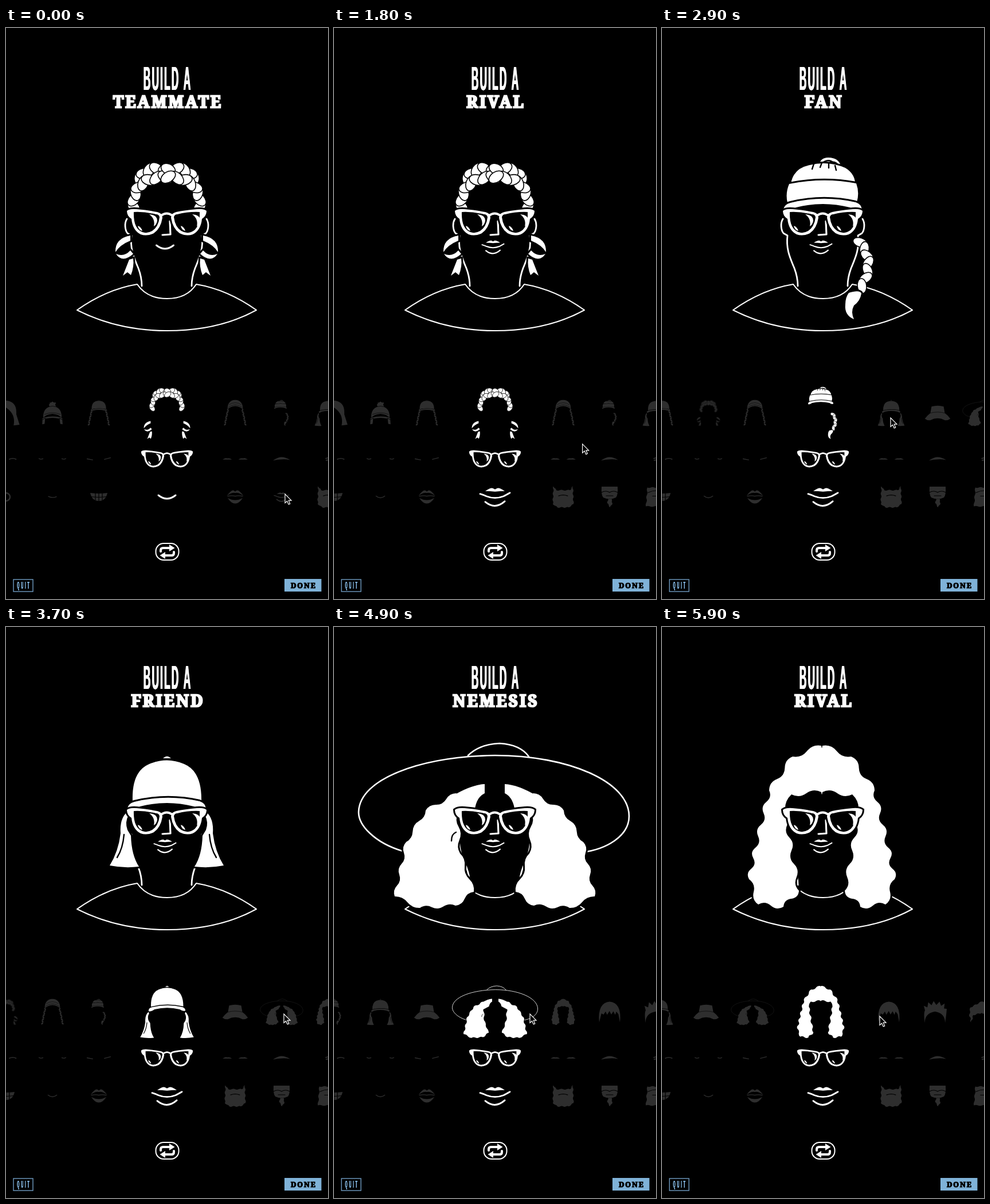
Recreate the animation shown at these times as an HTML page. Size 562x996 px, loop 6 s.

```html
<!DOCTYPE html>
<html lang="en">
<head>
<meta charset="utf-8">
<title>Build a character</title>
<style>
  html, body { margin: 0; width: 100%; height: 100%; overflow: hidden; background: #000; }
  svg { position: absolute; left: 0; top: 0; display: block; }
  .f { fill: #fff; stroke: #000; stroke-width: 6; paint-order: stroke; }
  .w { fill: #fff; }
  .l { fill: none; stroke: #fff; stroke-width: 2.6; stroke-linecap: round; stroke-linejoin: round; }
  .k { fill: none; stroke: #000; stroke-width: 2.4; stroke-linecap: round; }
  .lobe { fill: #fff; stroke: #000; stroke-width: 1.6; }
  .slab { font: 900 28px "Noto Serif", serif; text-anchor: middle; letter-spacing: 3px; }
  .narrow {
    position: absolute; line-height: 1; white-space: nowrap; color: #fff;
    font-family: "Liberation Sans", Arial, sans-serif; font-weight: 700;
    transform: translateX(-50%) scaleX(.3);
    text-shadow: .03em 0, -.03em 0;
  }
  #build { left: 281px; top: 59px; font-size: 58px; letter-spacing: 7px; text-indent: 7px; }
  #quit { left: 30px; top: 963.5px; font-size: 17px; letter-spacing: 10px; text-indent: 10px; color: #7fb0d8; }
</style>
</head>
<body>
<svg width="562" height="996" viewBox="0 0 562 996">
  <defs id="defs"></defs>
  <g id="face">
    <path class="l" style="stroke-width:2.1" d="M229 447Q175 456 124 492Q195 528 281 528Q372 528 437 492Q386 456 332 447Q316 472 281 472Q246 472 229 447Z"/>
    <g id="head"></g>
    <use id="hair"/>
    <path class="l" style="stroke-width:3.2" d="M286 337L287 360L273 361"/>
    <use href="#eyes3"/>
    <use id="mouth"/>
  </g>
  <g id="strips"></g>
  <text id="word" class="slab" x="282.5" y="138.8" fill="#fff" stroke="#fff" stroke-width="2.6"></text>
  <rect class="l" x="261.5" y="899" width="40" height="29" rx="13.5" style="stroke-width:2"/>
  <g id="shuffle"></g>
  <rect x="13" y="962" width="34" height="21" fill="none" stroke="#6f9cc2" stroke-width="1.4"/>
  <rect x="486" y="961" width="64.5" height="22" fill="#7fb2d8"/>
  <text class="slab" x="519.3" y="976.5" style="font-size:12.5px;letter-spacing:1.8px" stroke="#000" stroke-width="1.2">DONE</text>
  <path id="cursor" d="M0 0V15.5L3.6 12.2L6.2 18L8.7 16.9L6.3 11.2H11Z" fill="#000" stroke="#fff" stroke-width="1.2"/>
</svg>
<div id="build" class="narrow">BUILD A</div>
<div id="quit" class="narrow">QUIT</div>
<script>
const $ = id => document.getElementById(id);
const path = (cls, d) => `<path class="${cls}" d="${d}"/>`;
const fill = d => path('f', d), white = d => path('w', d), ink = d => path('k', d);
const line = (d, w = 2.6) => `<path class="l" d="${d}" style="stroke-width:${w}"/>`;
const flip = s => `<g transform="matrix(-1 0 0 1 561 0)">${s}</g>`;
const both = s => s + flip(s);
const scaled = (k, s) => `<g transform="scale(${k})">${s}</g>`;
const points = s => s.split(' ').map(p => p.split(',').map(Number));
const sym = (pts, axis) => [...pts, ...[...pts].reverse().map(([x, y]) => [axis - x, y])];

// Closed outline rippling along the given corners
function wave(pts, len, amp) {
  let d = `M${pts[0]}`, side = 1;
  pts.forEach(([a, b], i) => {
    const [x, y] = pts[(i + 1) % pts.length], dx = x - a, dy = y - b, h = Math.hypot(dx, dy) || 1;
    const n = Math.max(1, Math.round(h / len));
    for (let k = 0; k < n; k++, side = -side) {
      const m = (k + .5) / n, e = (k + 1) / n, o = amp * side / h;
      d += `Q${a + dx * m - dy * o} ${b + dy * m + dx * o} ${a + dx * e} ${b + dy * e}`;
    }
  });
  return d + 'Z';
}

// Tilted lobes along a quadratic curve
function braid(curve, n, rx, ry, tilt = 35) {
  const [[ax, ay], [cx, cy], [bx, by]] = points(curve);
  let s = '';
  for (let i = 0; i < n; i++) {
    const t = i / (n - 1), u = 1 - t;
    const x = u * u * ax + 2 * u * t * cx + t * t * bx, y = u * u * ay + 2 * u * t * cy + t * t * by;
    const dir = Math.atan2(u * (cy - ay) + t * (by - cy), u * (cx - ax) + t * (bx - cx)) * 180 / Math.PI;
    s += `<ellipse class="lobe" rx="${rx}" ry="${ry}" transform="translate(${x} ${y}) rotate(${dir + (i % 2 ? tilt : -tilt)})"/>`;
  }
  return s;
}

const brim = fill('M212 319Q212 308 224 305Q281 291 338 304Q348 307 349 317Q341 322 328 313Q281 301 234 313Q220 323 212 319Z');
const cap = white('M274 229Q281 222 288 229Z') +
  fill('M221 304Q219 252 250 239Q281 226 311 239Q342 252 341 304Q281 290 221 304Z') + brim;
const sideHair = both(fill('M212 322Q198 334 200 360Q196 392 181 416Q206 421 232 418Q219 398 218 364L212 354Q207 340 214 328Z') +
  ink('M206 362Q204 386 194 402'));
const plaits = both(braid('222,312 208,370 198,428', 8, 11, 7));
const crown = both(braid('233,264 244,240 278,246', 5, 13, 9) + braid('223,312 220,262 278,260', 8, 14, 9));
const bows = both(fill('M217 362Q190 367 191 391Q199 378 217 371Z') +
  fill('M192 394Q203 411 222 394L217 388Q206 400 192 394Z') +
  fill('M215 404L204 432L212 426L218 431Q224 416 222 402Z'));
const beanie = white('M274 240Q276 226 290 226Q310 226 313 244Z') + ink('M280 235Q292 227 300 236M290 236Q302 230 308 240') +
  fill('M225 271Q230 244 258 239Q290 231 320 244Q336 254 337 270Q281 256 225 271Z') +
  ink('M262 246L265 237M276 243L279 235M291 244V236M304 248L302 240') +
  fill('M222 272Q281 260 339 271Q345 287 340 304Q281 296 219 305Q215 288 222 272Z') + brim;
const tail = braid('346,374 372,408 349,450', 7, 13, 8) +
  fill('M326 462Q345 456 348 463Q346 476 335 484Q329 495 335 508Q318 501 320 482Q320 470 326 462Z');
const sunHat =
  line('M120 391C70 376 42 345 43 322C45 265 150 226 281 224C410 224 515 270 515 330C515 365 475 388 433 393') +
  line('M234 224Q255 204 289 203Q325 205 340 226') +
  both(fill(wave(points('214,290 160,320 126,375 106,470 150,490 212,486 244,462 220,395 216,325'), 21, 6)) +
    white('M208 294Q240 275 263 274V290Q250 296 246 316L212 334Z') + ink('M348 358Q356 361 356 373'));
const curls = fill(wave(sym(points('278,207 228,226 187,285 163,385 152,440 168,484 212,488 239,460 226,390 215,322 226,292 278,288'), 558), 22, 8));
const dome = 'M218 312Q216 232 281 230Q345 232 343 312Q330 284 281 280Q232 284 218 312Z';

const hair = [
  fill('M212 330Q205 245 281 238Q356 245 350 330L372 400L332 405Q348 330 281 285Q214 330 228 405L190 400Z'),
  fill(wave(points('262,202 300,202 304,238 258,238'), 12, 6)) + fill(dome) + brim + ink('M228 284Q281 262 334 284') +
    both(fill('M214 320L232 312L228 348L212 350Z')),
  cap + plaits,
  crown + bows,
  fill(dome) + ink('M224 290Q281 250 337 290M232 268Q281 236 329 268') + plaits,
  beanie + tail,
  sideHair + cap,
  fill('M232 284L240 240Q281 228 321 240L329 284Q352 300 366 322Q350 335 330 332Q281 306 231 332Q210 335 195 322Q210 300 232 284Z') + ink('M231 284Q281 270 330 284'),
  sunHat,
  curls,
  fill('M211 372Q198 240 281 233Q364 240 350 372L340 318L326 300L318 322L306 298L292 320L280 296L264 322L254 300L240 320L226 312Z'),
  fill('M212 370Q204 300 214 286L206 256L230 266L236 232L258 252L272 224L290 250L312 228L322 256L346 240L342 274L360 276Q358 310 349 370Q348 304 281 294Q214 304 212 370Z'),
  fill(wave(sym(points('281,214 206,254 198,300 210,355 226,305 281,290'), 562), 20, 7))
];

const rims = both(path('f', 'M211 319Q216 315 228 316Q250 318 264 321Q273 323 273 331Q270 350 258 358Q246 364 235 360Q221 353 219 333Q211 328 211 319Z') +
  path('', 'M223 321Q222 350 238 356Q246 359 255 354Q266 347 268 330Q267 325 262 325Q242 320 223 321Z'));
const glint = white('M250 325Q264 326 264 336Q263 343 258 346Q261 333 250 325ZM230 345Q236 347 238 354Q231 352 230 345Z');
const eyes = [
  line('M-45 0Q-30 -9 -9 0M27 0Q45 -9 63 0', 5),
  line('M-72 -3Q-63 3 -51 -2M51 -2Q63 3 72 -3', 4),
  line('M-63 -3L-33 3M30 0L63 -9', 4),
  rims + line('M271 327Q280.5 320 290 327', 4) + glint + `<g transform="translate(75)">${glint}</g>`,
  both(white('M213 348Q228 336 238 342Q250 338 263 348Z')),
  white('M-46 6Q-20 -12 0 -12Q20 -12 46 3Q18 -2 0 0Q-20 0 -46 6Z'),
  line('M-12 0L12 -6M-10 10L12 5', 5)
];

const bow = 'M-17 -11Q-8 -17 -4 -16L0 -14L4 -16Q8 -17 17 -11Q8 -11 0 -10Q-8 -11 -17 -11Z';
const mouths = [
  '<circle class="l" r="14" style="stroke-width:5"/>',
  line('M-14 1Q0 8 14 2'),
  white('M-30 -12Q0 -8 30 -12Q24 16 0 16Q-24 16 -30 -12Z') + ink('M-27 1Q0 5 27 1M-12 -11V14M0 -10V16M12 -11V14'),
  line('M-15 -4Q0 8 15 -4', 3),
  white('M-29 -1Q-14 -22 -6 -20L0 -16L6 -20Q14 -22 29 -1Q12 -14 0 -11Q-12 -14 -29 -1Z') +
    line('M-26 0Q-10 -3 0 0Q10 -3 26 0') + white('M-26 7Q0 21 26 7Q14 26 0 26Q-14 26 -26 7Z'),
  white(bow) + line('M-26 -6Q-19 -4 -15 -2Q0 4 15 -2Q19 -4 26 -8', 2.8) + line('M-17 8Q0 22 17 7', 3),
  white(wave(points('-34,-36 -24,-22 24,-22 34,-36 36,26 20,38 -20,38 -36,26'), 11, 3)) + ink('M-16 -2Q0 -8 16 -2'),
  white('M-28 -34H28Q30 -4 22 4Q0 14 -22 4Q-30 -4 -28 -34Z') + ink('M-28 -14Q-14 -22 0 -14Q14 -22 28 -14M-12 -2H12') +
    white(wave(points('-5,8 6,8 10,24 2,38 -8,24'), 9, 3)),
  white(wave(points('-30,-34 30,-34 35,32 -35,32'), 13, 3)) + ink('M-28 -16Q0 -30 28 -16M-12 -4H12')
];

// Moves are [start, duration, target...]
const rows = [
  { id: 'hair', items: hair, y: 671.5, fit: h => Math.min(.52, 91 / h),
    moves: [[2160, 400, 5], [2900, 300, 6], [3700, 150, 7.78], [4250, 350, 8], [5300, 300, 9.05]] },
  { id: 'eyes', items: eyes, y: 751.5, fit: () => .65, moves: [] },
  { id: 'mouth', items: mouths, y: 818, fit: () => 1, moves: [[450, 800, 5.45], [1300, 300, 5]] }
];
const pointer = [[450, 800, 288, 846], [1400, 600, 484, 684], [2160, 400, 322, 682], [2560, 300, 399, 680],
  [2900, 300, 318, 678], [3250, 400, 485, 675], [3700, 150, 342, 675], [5000, 250, 465, 683], [5300, 300, 380, 679]];
const words = 'TEAMMATE FRIEND RIVAL NEMESIS FAN FRIEND TEAMMATE NEMESIS RIVAL'.split(' ');
const LOOP = 6000, FADE = 400, STEP = 81, EXTRA = 38, FIRST = 3;

const clamp = v => Math.min(1, Math.max(0, v));
const ease = v => (v = clamp(v), v * v * (3 - 2 * v));
const follow = (from, moves, t, col = 2) =>
  moves.reduce((v, m) => v + (m[col] - v) * ease((t - m[0]) / m[1]), from);

// The item nearest the middle is picked
function findPicks(row) {
  const picks = [{ t: -FADE, item: FIRST }];
  for (let t = 0; t < LOOP; t += 10) {
    const item = Math.round(follow(FIRST, row.moves, t));
    if (item !== picks[picks.length - 1].item) picks.push({ t, item });
  }
  return picks;
}
const picked = (row, t) => row.picks.filter(p => p.t <= t).pop().item;

function weight(picks, item, t) {
  const n = picks.findIndex(p => p.item === item), next = picks[n + 1];
  if (n < 0) return 0;
  return clamp((t - picks[n].t) / FADE) ** 2 * (next ? 1 - ease((t - next.t) / FADE) : 1);
}

$('head').innerHTML = both(line('M211 333C206 341 208 353 212 358L219 362C216 386 224 402 231 419Q237 435 237 450', 2.8));
const arrow = line('M270 913V911Q270 907 274 907H286', 4) + white('M285 901L294.5 907L285 913Z');
$('shuffle').innerHTML = arrow + `<g transform="rotate(180 281.5 913.5)">${arrow}</g>`;
$('defs').innerHTML = rows.map(r => r.items.map((s, i) => `<g id="${r.id}${i}">${s}</g>`).join('')).join('');
$('strips').innerHTML = rows.map(r => `<g>${r.items.map((s, i) => `<use href="#${r.id}${i}"/>`).join('')}</g>`).join('');

rows.forEach((row, n) => {
  row.picks = findPicks(row);
  row.cells = [...$('strips').children[n].children].map(use => {
    const b = use.getBBox();
    return { use, cx: b.x + b.width / 2, cy: b.y + b.height / 2, width: b.width, k: row.fit(b.height) };
  });
});
const [hairRow, , mouthRow] = rows;
const changes = [...hairRow.picks, ...mouthRow.picks].map(p => p.t).filter(t => t > 0).sort((a, b) => a - b);

function layout(row, t) {
  let x = 281 - STEP / 2 - EXTRA - STEP * follow(FIRST, row.moves, t);
  row.cells.forEach(({ use, cx, cy, k }, i) => {
    const w = weight(row.picks, i, t), half = STEP / 2 + EXTRA * w;
    x += half;
    use.setAttribute('transform', `translate(${x} ${row.y}) scale(${k * (1 + w) / 2}) translate(${-cx} ${-cy})`);
    use.setAttribute('opacity', .18 + .82 * w);
    x += half;
  });
}

function draw() {
  const t = performance.now() % LOOP;
  rows.forEach(r => layout(r, t));
  const m = picked(mouthRow, t), { cx, cy, width } = mouthRow.cells[m];
  $('hair').setAttribute('href', '#hair' + picked(hairRow, t));
  $('mouth').setAttribute('href', '#mouth' + m);
  $('mouth').setAttribute('transform', `translate(277.5 382) scale(${Math.min(1, 38 / width)}) translate(${-cx} ${-cy})`);
  $('word').textContent = words[changes.filter(c => c <= t).length];
  $('cursor').setAttribute('transform', `translate(${follow(487, pointer, t, 2)} ${follow(813, pointer, t, 3)})`);
  requestAnimationFrame(draw);
}
draw();
</script>
</body>
</html>
```
